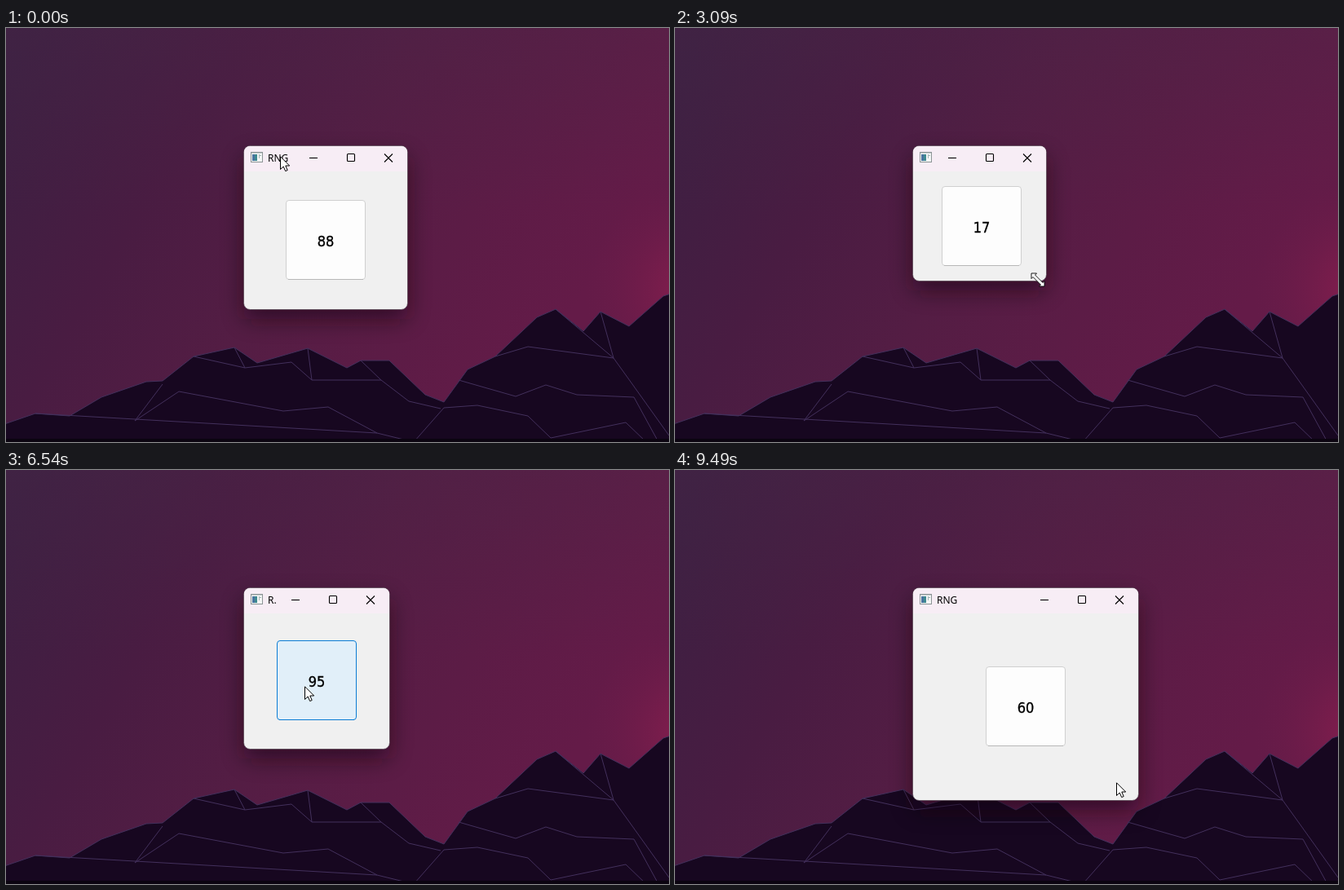
Write an HTML page that moves like this. It is 813 px wide and 508 px high and loops after 9.51 s.

```html
<!DOCTYPE html>
<html lang="en">
<head>
<meta charset="utf-8">
<title>RNG</title>
<style>
  html, body { margin: 0; width: 100%; height: 100%; overflow: hidden; background: #170720; }
  svg { display: block; width: 813px; height: 508px; }
  .title { font: 12px "Noto Sans", "Open Sans", sans-serif; }
  .number { font: 18px "DejaVu Sans Condensed", "Noto Sans", sans-serif; text-anchor: middle; stroke: #000; stroke-width: .35; }
  .glyph { fill: none; stroke: #000; stroke-width: 1.1; }
</style>
</head>
<body>
<svg viewBox="0 0 813 508">
  <defs>
    <linearGradient id="sky" gradientUnits="userSpaceOnUse" x1="0" y1="60" x2="640" y2="440">
      <stop offset="0" stop-color="#3c2042"/>
      <stop offset=".3" stop-color="#491c42"/>
      <stop offset=".55" stop-color="#541d44"/>
      <stop offset="1" stop-color="#641b48"/>
    </linearGradient>
    <linearGradient id="haze" x1="0" y1="0" x2="0" y2="1">
      <stop offset="0" stop-color="#4a2847" stop-opacity=".3"/>
      <stop offset=".45" stop-color="#4a2847" stop-opacity="0"/>
    </linearGradient>
    <radialGradient id="glow" gradientUnits="userSpaceOnUse" cx="850" cy="325" r="140">
      <stop offset="0" stop-color="#8c1d50"/>
      <stop offset=".4" stop-color="#7c1d4c" stop-opacity=".7"/>
      <stop offset="1" stop-color="#6b1c49" stop-opacity="0"/>
    </radialGradient>
    <filter id="blur" filterUnits="userSpaceOnUse" x="200" y="60" width="613" height="500">
      <feGaussianBlur stdDeviation="14"/>
    </filter>
  </defs>

  <rect width="813" height="508" fill="url(#sky)"/>
  <rect width="813" height="508" fill="url(#haze)"/>
  <rect width="813" height="508" fill="url(#glow)"/>

  <g stroke="#43305c" stroke-linejoin="round">
    <path id="mountains" fill="#170720"/>
    <path id="creases" fill="none"/>
  </g>
  <rect y="504" width="813" height="4" fill="#0b0410"/>

  <rect id="shadow" x="292" y="158" rx="8" fill="#18040f" opacity=".58" filter="url(#blur)"/>
  <rect id="frame" x="291.5" y="144.5" rx="8" fill="#f0f0f0" stroke="#4b3a48" stroke-opacity=".65"/>
  <path id="bar" fill="#f7edf5"/>
  <g transform="translate(300 152)">
    <rect x=".5" y=".5" width="14" height="12" fill="#f4f6f6" stroke="#8d9596"/>
    <path d="M1 1.5H14" stroke="#c3cacb"/>
    <rect x="2" y="3" width="6" height="8" fill="#3f8a90"/>
    <rect x="2" y="3" width="3" height="8" fill="#4a75a0"/>
    <path d="M10 4.5H13M10.5 3V8" stroke="#a5b8b8"/>
  </g>
  <text id="title" class="title" x="321" y="164"></text>
  <g id="controls" class="glyph">
    <path d="M-120 159.5H-110"/>
    <rect x="-73.5" y="154.5" width="9" height="9" rx="1"/>
    <path d="M-28 154.5L-18 164.5M-18 154.5L-28 164.5"/>
  </g>
  <g id="button">
    <rect id="face" x=".5" y=".5" width="97" height="97" rx="3.5"/>
    <path id="edge" d="M3 97.5H95" fill="none"/>
    <text id="number" class="number" x="49" y="57"></text>
  </g>

  <path id="arrow" fill="#fff" stroke="#000" d="M.5 .8V16.5L4.2 13 6.7 18.6 9.2 17.5 6.8 12H11.7Z"/>
  <path id="resize" fill="#fff" stroke="#000" stroke-width=".9" d="M-8 -8H-1.500L-3.500 -6 6 3.500 8 1.500V8H1.500L3.500 6 -6 -3.500 -8 -1.500Z"/>
</svg>
<script>
const LOOP = 9510, STEP = 130;
const $ = id => document.getElementById(id);
const set = (id, attrs) => {
  for (const name in attrs) $(id).setAttribute(name, attrs[name]);
};
const clamp = v => Math.max(0, Math.min(1, v));
const ease = p => p * p * (3 - 2 * p);

const ridge = [
  [-2, 486], [36, 473], [78, 476], [117, 453], [172, 434], [192, 433], [230, 403], [280, 392],
  [308, 411], [370, 393], [418, 417], [435, 408], [470, 408], [514, 450], [537, 459], [566, 419],
  [600, 403], [651, 355], [674, 345], [708, 372], [729, 348], [764, 366], [806, 329], [815, 326]
];
const folds = [
  [[230, 403], [293, 417], [350, 410], [375, 432], [460, 432], [494, 458], [533, 467]],
  [[192, 437], [158, 482], [212, 446], [340, 470], [395, 465], [455, 497], [500, 508]],
  [[600, 403], [640, 391], [745, 405], [763, 430], [813, 500]],
  [[555, 432], [625, 452], [662, 438], [700, 450], [770, 453], [800, 508]],
  [[500, 508], [537, 466], [578, 463], [640, 476], [668, 503], [760, 484], [785, 508]]
];

// Every summit drops a crease to the closest fold point on its lower right.
function spurs() {
  const summits = ridge.slice(1, -1).filter(([, y], i) => y < ridge[i][1] && y <= ridge[i + 2][1]);
  return summits.map(([x, y]) => {
    const below = folds.flat().filter(p => p[0] > x && p[1] > y + 10);
    const distance = p => Math.hypot(p[0] - x, p[1] - y);
    return [[x, y], below.sort((a, b) => distance(a) - distance(b))[0]];
  });
}
const polyline = points => "M" + points.join("L");
set("mountains", { d: polyline(ridge) + "V510H-2Z" });
set("creases", { d: [...folds, ...spurs()].map(polyline).join("") });

// Moves: start, end, then the place to reach.
const cornerMoves = [
  [1690, 2270, 737, 478], [2400, 2990, 455, 310], [3120, 3640, 470, 342], [8980, 9360, 568, 405]
];
const pointerMoves = [
  [0, 540, 391, 272], [1100, 1560, 478, 329], [3900, 4550, 391, 277], [5100, 5560, 471, 334],
  [6100, 6500, 366, 265], [6700, 7000, 653, 310], [7000, 7670, 380, 262], [8200, 8800, 462, 336],
  [9400, 9490, 541, 383]
];
const visits = [
  { enter: 300, press: 810, leave: 1300, number: 17 },
  { enter: 4250, press: 4920, leave: 5300, number: 95 },
  { enter: 6215, press: 6660, leave: 6800, number: 24 },
  { enter: 7445, press: 8030, leave: 8400, number: 60 }
];

function glide(place, moves, t) {
  for (const [from, to, ...goal] of moves) {
    const p = ease(clamp((t - from) / (to - from)));
    place = place.map((v, i) => v + (goal[i] - v) * p);
  }
  return place.map(Math.round);
}

// 0 idle, 1 hovered, 2 pressed
function heat(t) {
  const levels = visits.map(({ enter, press, leave }) =>
    t >= press && t < press + STEP ? 2
      : Math.min(clamp((t - enter) / 300), clamp(1 - (t - leave) / 375)));
  return Math.max(...levels);
}

function blend(colors, level) {
  const i = level > 1 ? 1 : 0;
  return `rgb(${colors[i].map((v, c) => Math.round(v + (colors[i + 1][c] - v) * (level - i)))})`;
}
const hovered = [0, 120, 212], pressed = [0, 84, 153];
const fills = [[253, 253, 253], [224, 238, 249], [204, 228, 247]];
const strokes = [[208, 208, 208], hovered, pressed];
const bottoms = [[184, 184, 184], hovered, pressed];

function draw(time) {
  const t = Math.floor(time / STEP) * STEP;
  const [right, bottom] = glide([492, 345], cornerMoves, t);
  const level = heat(t);

  set("shadow", { width: right - 292, height: bottom - 146 });
  set("frame", { width: right - 291, height: bottom - 144 });
  set("bar", { d: `M292 176V153Q292 145 300 145H${right - 8}Q${right} 145 ${right} 153V176Z` });
  set("controls", { transform: `translate(${right} 0)` });
  $("title").textContent = right > 478 ? "RNG" : right > 464 ? "R." : "";

  // The content keeps a minimum size when the window gets smaller.
  const left = Math.floor((292 + Math.max(right, 460)) / 2) - 49;
  const top = Math.floor((175 + Math.max(bottom, 311)) / 2) - 49;
  set("button", { transform: `translate(${left} ${top})` });
  set("face", { fill: blend(fills, level), stroke: blend(strokes, level) });
  set("edge", { stroke: blend(bottoms, level) });
  const done = visits.filter(({ press }) => t >= press + STEP).pop();
  $("number").textContent = done ? done.number : 88;

  const sizing = (t >= 1690 && t < 3900) || (t >= 8800 && t < 9400);
  const [x, y] = sizing ? [right - 10, bottom - 1] : glide([336, 157], pointerMoves, t);
  const transform = `translate(${x} ${y})`;
  set("arrow", { transform, visibility: sizing ? "hidden" : "visible" });
  set("resize", { transform, visibility: sizing ? "visible" : "hidden" });
}

const start = performance.now();
function loop() {
  draw((performance.now() - start) % LOOP);
  requestAnimationFrame(loop);
}
loop();
</script>
</body>
</html>
```
